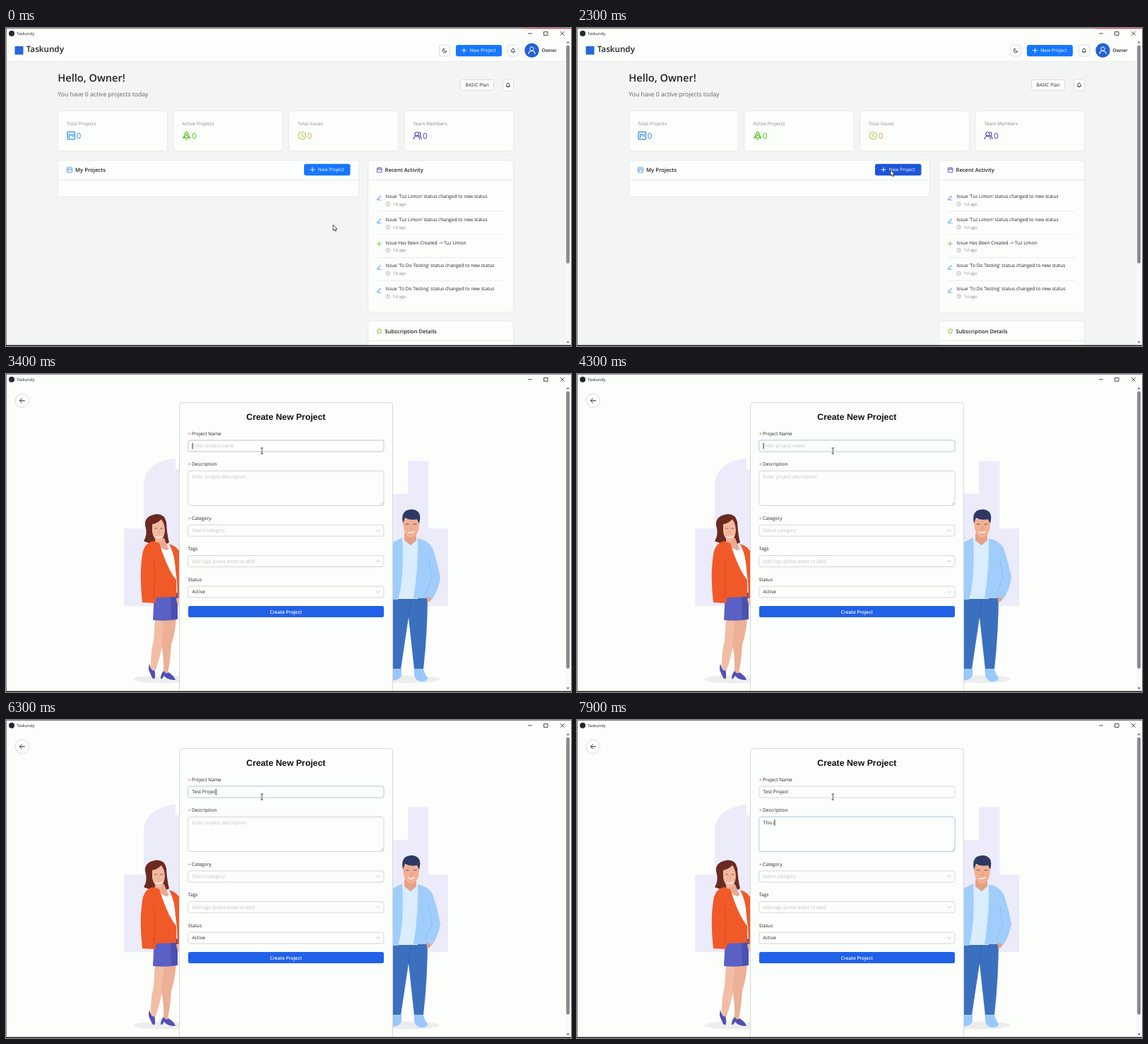
Write an HTML page that moves like this. It is 800 px wide and 451 px high and loops after 8000 ms.

```html
<!DOCTYPE html>
<html lang="en">
<head>
<meta charset="utf-8">
<title>Project dashboard</title>
<style>
html, body { margin: 0; width: 100%; height: 100%; overflow: hidden; background: #fcfefc; }
svg { display: block; width: 800px; height: 451px; }
text { font-family: "Open Sans", "Noto Sans", sans-serif; text-rendering: geometricPrecision; white-space: pre; }
.line { fill: none; stroke-linecap: round; stroke-linejoin: round; }
</style>
</head>
<body>
<svg id="stage" viewBox="0 0 800 451"></svg>
<script>
const INK = '#222426', GREY = '#85898a', HINT = '#bcc0c0', PAPER = '#fcfefc', BLUE = '#1677ff';
const APP = 'Taskundy', USER = 'Owner', ISSUE = 'Tuz Limon';

const text = (x, y, s, size = 6.65, fill = INK, weight = 400, more = '') =>
  `<text x="${x}" y="${y}" font-size="${size}" fill="${fill}" font-weight="${weight}" ${more}>${s}</text>`;
const rect = (x, y, w, h, fill, r = 0, stroke = 'none', more = '') =>
  `<rect x="${x}" y="${y}" width="${w}" height="${h}" rx="${r}" fill="${fill}" stroke="${stroke}" ${more}/>`;
const line = (d, stroke = INK, width = 1, more = '') =>
  `<path class="line" d="${d}" stroke="${stroke}" stroke-width="${width}" ${more}/>`;
const shape = (fill, d, more = '') => `<path fill="${fill}" d="${d}" ${more}/>`;
const circle = (x, y, r, fill, stroke = 'none') =>
  `<circle cx="${x}" cy="${y}" r="${r}" fill="${fill}" stroke="${stroke}"/>`;
const at = (x, y, s, k = 1) => `<g transform="translate(${x} ${y}) scale(${k})">${s}</g>`;
const card = (x, y, w, h) => rect(x, y, w, h, PAPER, 4, '#e8eaea');

// Icons are centred on 0,0
const icon = {
  board: c => rect(-5, -5, 10, 10, 'none', .8, c, 'stroke-width="1.2"') + line('M-2.5-2.5V2.5M0-2.5V0M2.5-2.5V1.2', c, 1.3),
  rocket: c => line('M-2.5 3V-1.5Q-2-4.5 0-5.5Q2-4.5 2.5-1.5V3ZM-2.5 0L-4.8 3H4.8L2.5 0M-1.2 5.3H1.2', c, 1.1) + circle(0, -1, .9, 'none', c),
  clock: c => circle(0, 0, 5, 'none', c) + line('M0-2.8V.3L2 1.3', c, 1),
  team: c => circle(-1.2, -2.2, 2.5, 'none', c) + line('M-5.2 4.8Q-4.8.6-1.2.6T2.8 4.8M2-4.7Q4.4-4 4.2-2T2.4.3Q4.9 1.2 5.2 4.4', c, 1),
  calendar: c => rect(-3.3, -2.8, 6.6, 6, 'none', .5, c, 'stroke-width=".9"') + line('M-3.3-.6H3.3M-1.5-3.8V-2M1.5-3.8V-2', c, .9),
  star: c => line('M0-3.8L1.1-1.3L3.8-1L1.8.9L2.3 3.5L0 2.2L-2.3 3.5L-1.8.9L-3.8-1L-1.1-1.3Z', c, .9),
  pen: c => line('M-2 1.3L1.3-2.4L2.5-1.3L-.8 2L-2.3 2.4ZM-2.8 3.5H2.8', c, .8),
  plus: c => line('M-3 0H3M0-3V3', c, .9),
  bell: c => line('M-2.1 1.6V-.5Q-2-2.5 0-2.5T2.1-.5V1.6M-2.8 1.7H2.8M0-3.2V-2.6M-.6 3H.6', c, .8),
  moon: c => line('M-.9-2.8A3 3 0 1 0 2.9.9Q.6 1.9-.6.4T-.9-2.8Z', c, .8),
  user: c => circle(0, -2, 2.7, 'none', c) + line('M-4.7 5Q-4.2.9 0 .9T4.7 5', c, 1.1),
  down: c => line('M-2.2-1.2L0 1.2L2.2-1.2', c, .8)
};

function chrome(thumbEnd) {
  return text(15, 10.3, APP, 5.8) + circle(8, 7.8, 4, '#23282c') +
    line('M739.5 7.8H744.5M762 5.3H767V10.3H762ZM785.3 5.3L790.3 10.3M790.3 5.3L785.3 10.3', '#333', .9) +
    rect(792, 15.5, 7.5, 434, '#f7f9f8') + rect(793.2, 24.5, 4.8, thumbEnd - 24.5, '#888b8b', 2.4) +
    shape('#777', 'M793.5 21.5L795.7 18.5L797.9 21.5ZM793.5 444.5L795.7 447.5L797.9 444.5Z');
}

function activity(i) {
  const made = i === 2, y = 238.4 + i * 32.8, name = i < 3 ? ISSUE : 'To Do Testing';
  return at(528.3, y + 2, made ? icon.plus('#76bd3c') : icon.pen('#4595e6')) +
    text(537.5, y + 2.5, made ? `Issue Has Been Created -&gt; ${name}` : `Issue '${name}' status changed to new status`) +
    at(540.7, y + 11.2, icon.clock(GREY), .55) + text(547.8, y + 13.4, '1d ago', 6, GREY) +
    (i < 4 ? line(`M525 ${y + 21.6}H705.5`, '#e9ebeb', .9) : '');
}

function stat(x, label, name, colour, value = colour) {
  return card(x, 117.5, 155, 57) + text(x + 12.5, 137.8, label, 6.65, GREY) +
    at(x + 18.7, 152.7, icon[name](colour), 1.05) + text(x + 26.3, 157, '0', 11.4, value);
}

const smallButton = (x, y, name) =>
  rect(x - 7.5, y - 8, 15, 16, PAPER, 3, '#dcdfdf') + at(x, y, icon[name](INK));

const dashboard = rect(0, 0, 800, 451, '#f3f5f4') + rect(0, 0, 800, 47, PAPER) + line('M0 47.5H792', '#e9ecec') +
  chrome(334) +
  rect(12.5, 25.8, 12, 12, '#2468d8', 1) + text(28.7, 34.2, APP, 11.7, INK, 600) +
  smallButton(621, 32, 'moon') + rect(637, 24, 65, 16.3, BLUE, 3) + at(648.5, 31.8, icon.plus('#fff')) +
  text(656.3, 34.3, 'New Project', 6.7, '#fff') + smallButton(718, 32, 'bell') +
  circle(744.5, 31.8, 10.2, '#2461d6') + at(744.5, 31.6, icon.user('#fff')) + text(758.5, 34.3, USER, 6.6, INK, 600) +
  text(73.3, 75.6, `Hello, ${USER}!`, 14.6, INK, 600) + text(73.3, 97.3, 'You have 0 active projects today', 8.62, '#5d6162') +
  rect(643.5, 73.5, 47, 14.5, PAPER, 2, '#d9dcdc') + text(650.5, 83.3, 'BASIC Plan') + smallButton(711, 81, 'bell') +
  stat(73.5, 'Total Projects', 'board', '#2e8ae6') + stat(237, 'Active Projects', 'rocket', '#52c41a') +
  stat(400.5, 'Total Issues', 'clock', '#a9c93c', '#f59a4d') + stat(564, 'Team Members', 'team', '#5436b3') +
  card(73.5, 187.5, 426, 52) + line('M74 215.5H499', '#e9ebeb') +
  at(90, 201.3, icon.board('#3b91e8'), .7) + text(98, 204.4, 'My Projects', 7.7, INK, 600) +
  rect(422, 192.7, 65.5, 16.5, BLUE, 3, 'none', 'id="newButton"') + at(434, 200.9, icon.plus('#fff')) +
  text(441.8, 203.4, 'New Project', 6.6, '#fff') +
  card(512.5, 187.5, 206, 215.5) + line('M513 215.5H718', '#e9ebeb') +
  at(528.7, 201.5, icon.calendar('#6548bd')) + text(536.6, 204.4, 'Recent Activity', 7.6, INK, 600) +
  [0, 1, 2, 3, 4].map(activity).join('') +
  card(512.5, 415.5, 206, 60) + line('M513 443.5H718', '#e9ebeb') +
  at(528.7, 429.8, icon.star('#8fc73e')) + text(536.6, 432.8, 'Subscription Details', 7.6, INK, 600);

const skyline = shape('#ecebfa', 'M167 219H195V152Q201 124 240 119.5V135H260V329H167ZM540 170H569V123.5H598.5V219H626V329H540Z');

const woman = '<ellipse cx="222" cy="433" rx="42" ry="5.5" fill="#eceeed"/>' +
  shape('#f1bea5', 'M211 345H228Q226 362 222 378Q219 401 211 422L205 423Q204 397 209 378Z') +
  shape('#ecb096', 'M224 345H241Q240 366 234 384Q233 405 229 425L223 424Q224 402 220 385Z') +
  shape('#4f50b5', 'M203 411Q201 418 203 422L207 431Q212 436 211 424L210 420Q206 423 203 411ZM223 421Q219 426 219 432H221L224 428Q228 434 240 434Q239 429 230 423Q227 427 223 421Z') +
  shape('#5a60c4', 'M210 310H243V348Q226 351 208 349Z') + shape('#4b50b1', 'M233 316L243 311V347L234 349Z') +
  shape('#6b2a20', 'M211 199Q224 197 227 210Q228 228 231 239Q218 247 195 237Q201 228 197 214Q196 202 211 199Z') +
  shape('#eba98f', 'M211 231L224 233L230 248L223 255L211 241Z') +
  shape('#f3b9a0', 'M207 213Q214 212 220 206Q225 213 225 223Q223 236 217 238Q209 235 207 224Z') +
  line('M210.5 219H214M218.5 219H222', '#7b4034', .8) + line('M216 221L217 227H215', '#dc967e', .7) +
  line('M212.5 231Q217 233 221 230', '#fff', 1.3) +
  shape('#fff', 'M219 246L226 250L238 249L241 296L231 286Z') +
  shape('#f05a28', 'M208 237Q198 239 194 251Q188 282 193 324L211 325L213 317L241 316V292Q229 278 217 240ZM231 241Q246 245 250 262V326H242Q244 300 240 278Q239 256 231 241Z') +
  line('M209 264Q212 286 209 318', '#d7471c', .8) +
  shape('#f1bea5', 'M241 318L250 318V333Q243 332 241 318Z');

const man = '<ellipse cx="568" cy="433" rx="46" ry="5.5" fill="#eceeed"/>' +
  shape('#3b70bf', 'M540 311H597Q597 365 591 419H578L570 345L559 419H540Z') + line('M570 345L573 318', '#315fa8', .8) +
  shape('#9bc8fa', 'M540 418H560V428Q555 437 540 434ZM578 418H591Q592 424 597 431Q597 437 586 436Q576 433 578 418Z') +
  shape('#d9edfc', 'M558 235L585 235L583 319H554Z') +
  shape('#e6a084', 'M564 226H581V236L573 243L564 236Z') +
  shape('#f1b093', 'M562 207Q573 201 585 207Q586 223 580 229Q573 235 567 229Q562 222 562 207Z') +
  shape('#2c3964', 'M562 212Q559 199 566 194Q577 189 584 196Q588 201 585 212L582 206Q572 208 565 204Z') +
  line('M566 213H570M577 213H581', '#49435c', .9) + line('M574 215L575 220H572', '#d4896d', .7) +
  line('M569.5 224.5Q574 226 578 223.5', '#fff', 1.3) +
  shape('#a0cdfb', 'M561 232Q549 238 540 243V320H555Q564 290 561 232ZM583 233Q598 236 604 247Q611 267 615 289Q612 307 603 320L594 316L597 318H577Q584 274 583 233Z') +
  shape('#e6a084', 'M595 315L602 318.5Q601 323 596.5 324Z') +
  line('M599 264L603 289L594 311', '#84b8ef', .8);

function field(y, h, hint, id, select) {
  return rect(257.8, y, 277.2, h, PAPER, 3, '#d3d7d7', id ? `id="${id}Box"` : '') +
    text(263.5, y + 10.4, hint, 6.65, hint === 'Active' ? INK : HINT, 400, id ? `id="${id}"` : '') +
    (select ? at(527, y + 8, icon.down('#b5b9b9')) : '');
}
const label = (y, s, needed) => (needed ? text(258, y + .7, '*', 6, '#c9474a') : '') + text(needed ? 263 : 257.8, y, s);

const form = rect(0, 0, 800, 451, PAPER) + chrome(418) +
  circle(22.7, 37.8, 9.8, PAPER, '#d8dbdb') + line('M19.4 37.8H26.4M22.4 34.8L19.4 37.8L22.4 40.8', INK, 1) +
  skyline + woman + man + rect(245.5, 40.5, 302, 430, PAPER, 4, '#d4d8d8') +
  text(396.3, 64.6, 'Create New Project', 12.3, '#111', 700, 'text-anchor="middle" style="font-family:Liberation Sans,sans-serif"') +
  label(86.8, 'Project Name', true) + field(94, 16, '', 'name') +
  label(130.2, 'Description', true) + field(137.5, 49, '', 'about') + line('M531 185L534 182M533 185L534 184', '#999', .6) +
  label(206.8, 'Category', true) + field(214, 16, 'Select category', '', true) +
  label(250.2, 'Tags') + field(257.5, 16, 'Add tags (press enter to add)', '', true) +
  label(293.7, 'Status') + field(301, 16, 'Active', '', true) +
  rect(258, 329, 277, 16, '#2161e8', 2.5) +
  text(396.3, 339.5, 'Create Project', 6.6, '#fff', 600, 'text-anchor="middle"') +
  '<path id="caret" stroke="#111" stroke-width=".8"/>';

const pointers = {
  arrow: shape('#fff', 'M0 0V8.3L1.9 6.6L3.2 9.3L4.6 8.6L3.3 6H5.8Z', 'stroke="#222" stroke-width=".8"'),
  hand: shape('#fff', 'M-1 1Q0-.7 1 1V4.5L4 5.1Q5.4 5.5 5 7.2L4.2 11H-.7L-3.6 7.3Q-3.7 5.6-1 7.2Z', 'stroke="#222" stroke-width=".8"'),
  beam: line('M-1.5-4H1.5M0-4V4M-1.5 4H1.5', '#333', .8)
};

const stage = document.getElementById('stage');
stage.innerHTML = `<g id="home">${dashboard}</g><g id="form">${form}</g>` +
  line('M0 .5H800M.5 0V451', '#333', .6) + rect(0, 449.7, 800, 1.3, '#111') + rect(734, 0, 66, 1, '#e33', 0, 'none', 'id="redEdge"') +
  Object.entries(pointers).map(([id, s]) => `<g id="${id}">${s}</g>`).join('');
const $ = id => document.getElementById(id);
const show = (el, on) => el.setAttribute('visibility', on ? 'visible' : 'hidden');
const set = (id, attrs) => Object.entries(attrs).forEach(([k, v]) => $(id).setAttribute(k, v));

const LOOP = 8000, PRESS = 2200, OPEN = 2400, FOCUS = 3300, TAB = 6900;
const inputs = [
  { id: 'name', y: 97.6, value: 'Test Project', hint: 'Enter project name', from: FOCUS, to: TAB,
    keys: [4700, 4850, 5000, 5150, 5500, 5600, 5750, 5850, 6000, 6150, 6250, 6400] },
  { id: 'about', y: 141, value: 'This i', hint: 'Enter project description', from: TAB, to: LOOP,
    keys: [7300, 7500, 7600, 7700, 7800, 7900] }
];

// Time, x and y of the pointer tip
const path = [[0, 463.2, 279], [100, 463.2, 279], [800, 440, 202.5], [1000, 440, 202.5], [1200, 444, 201.5],
  [2500, 444, 201.5], [3250, 362.3, 109], [LOOP, 362.3, 109]];

function pointerAt(t) {
  const i = path.findIndex(p => p[0] > t), [t0, x0, y0] = path[i - 1], [t1, x1, y1] = path[i];
  const p = (t - t0) / (t1 - t0), e = p * p * (3 - 2 * p);
  return [x0 + (x1 - x0) * e, y0 + (y1 - y0) * e];
}

function drawInput(input, t) {
  const { id, keys } = input, done = keys.filter(k => k <= t), el = $(id);
  el.textContent = input.value.slice(0, done.length) || input.hint;
  el.setAttribute('fill', done.length ? INK : HINT);
  const focused = t >= input.from && t < input.to;
  const glow = focused ? Math.min(1, Math.max(0, (t - input.from - 100) / 200)) : 0;
  const mix = (a, b) => Math.round(a + (b - a) * glow);
  const grey = focused ? 190 : 211;
  set(id + 'Box', {
    stroke: `rgb(${mix(grey, 176)},${mix(grey + 4, 206)},${mix(grey + 4, 224)})`,
    style: glow ? `filter:drop-shadow(0 0 1px rgba(70,155,235,${glow * .15}))` : ''
  });
  if (!focused) return;
  const x = 264 + (done.length ? el.getComputedTextLength() : 0);
  set('caret', { d: `M${x} ${input.y}v9` });
  show($('caret'), (t - (done.at(-1) || input.from)) % 1000 < 500);
}

function draw(t) {
  const open = t >= OPEN, [x, y] = pointerAt(t);
  show($('home'), !open);
  show($('form'), open);
  show($('redEdge'), !open);
  show($('caret'), false);
  if (open) inputs.forEach(input => drawInput(input, t));

  const hover = !open && x > 422 && x < 487 && y > 192 && y < 209;
  const inField = open && x > 258 && x < 535 && (y < 110 || y > 137 && y < 187);
  $('newButton').setAttribute('fill', t >= PRESS ? '#1d56d8' : hover ? '#4389f6' : BLUE);
  const kind = inField ? 'beam' : hover && t < PRESS ? 'hand' : 'arrow';
  for (const id in pointers) show($(id), id === kind);
  set(kind, { transform: `translate(${x} ${y})` });
}

function tick() {
  draw(performance.now() % LOOP);
  requestAnimationFrame(tick);
}
tick();
</script>
</body>
</html>
```
